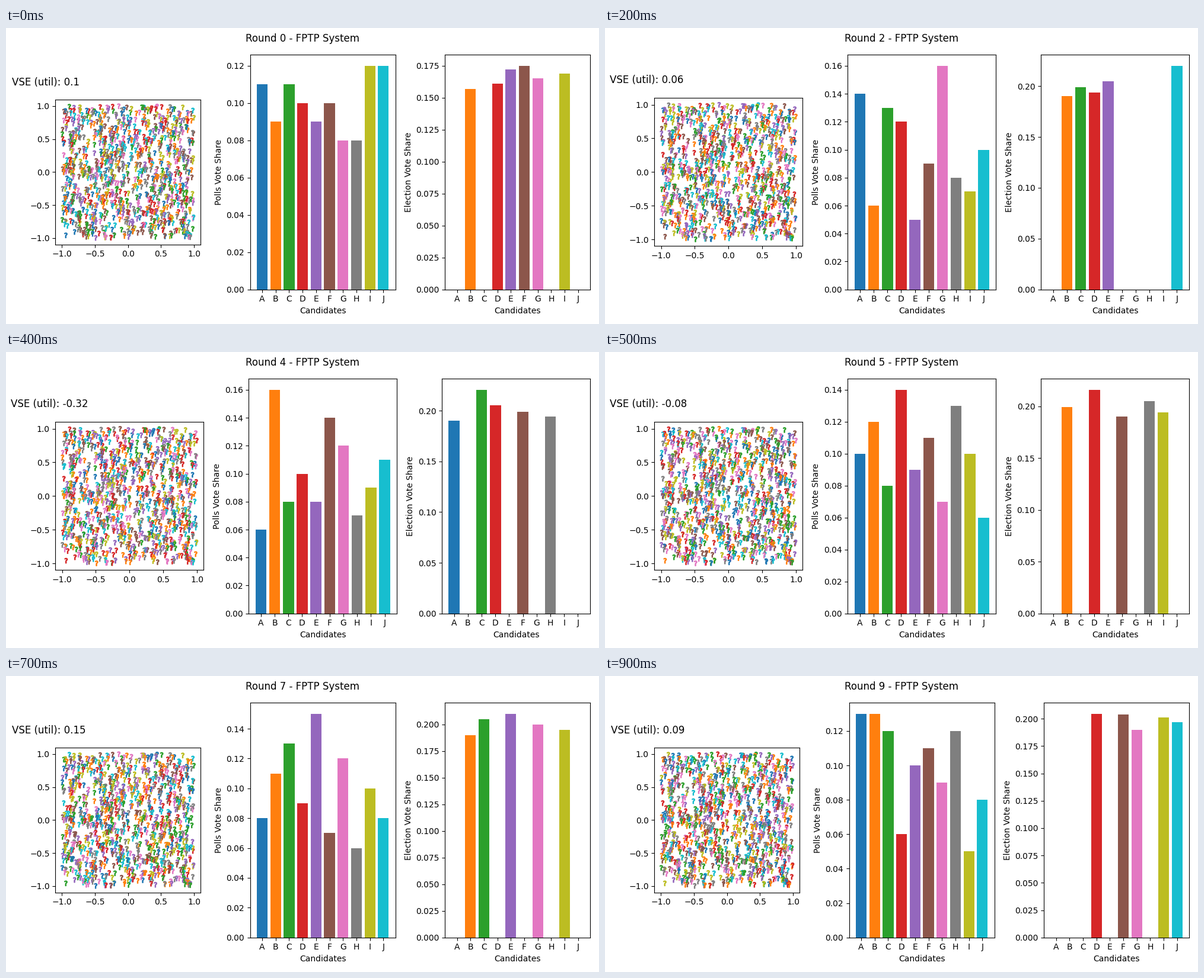
Write a matplotlib script that moves like this. It is 1000 by 500 pixels and loops after 1000 ms.

```python
import numpy as np
import matplotlib.pyplot as plt
from matplotlib.animation import FuncAnimation

NAMES = "ABCDEFGHIJ"
COLORS = [f"C{i}" for i in range(10)]
VOTERS = 1000

# Each round: utility, poll ranking with its best and worst share,
# election ranking with the winner's share
ROUNDS = [
    (0.1, "IJCADFBEHG", 0.12, 0.08, "FEIGDB", 0.175),
    (0.13, "CEHJAGDBFI", 0.13, 0.06, "CHJAE", 0.206),
    (0.06, "GACDJFHIBE", 0.16, 0.05, "JECDB", 0.22),
    (-0.05, "FACHBDEGIJ", 0.16, 0.06, "ACDFB", 0.2115),
    (-0.32, "BFGJDICEHA", 0.16, 0.06, "CDFHA", 0.2205),
    (-0.08, "DHBFAIECGJ", 0.14, 0.06, "DHBIF", 0.216),
    (0.21, "EFGIDACHJB", 0.13, 0.05, "FBGIAJ", 0.1875),
    (0.15, "ECGBIDJAFH", 0.15, 0.06, "ECGIB", 0.21),
    (0.19, "ADFIJGHCEB", 0.14, 0.05, "CFBEG", 0.2215),
    (0.09, "ABHCFEGJDI", 0.13, 0.05, "DFIJG", 0.2045),
]

voters = np.random.default_rng(7).uniform(-1, 1, (VOTERS, 2))

fig, (ax_map, ax_poll, ax_vote) = plt.subplots(1, 3, figsize=(10, 5), dpi=100)


def ranked_shares(ranking, high, low, digits):
    """Shares falling from high to low, bent so that they add up to about 1."""
    mean = 1 / len(ranking)
    bend = (mean - low) / (high - mean)
    t = np.linspace(0, 1, len(ranking)) ** bend
    shares = dict(zip(ranking, np.round(high - (high - low) * t, digits)))
    return [shares.get(name, 0) for name in NAMES]


def draw_voters(ax, n, utility):
    choice = np.random.default_rng(100 + n).integers(0, 10, VOTERS)
    ax.clear()
    ax.scatter(*voters.T, c=[COLORS[i] for i in choice], marker="$?$")
    ax.set(xlim=(-1.098, 1.098), ylim=(-1.098, 1.098), aspect="equal")
    ax.text(-0.3, 1.1, f"VSE (util): {utility}", fontsize=12,
            transform=ax.transAxes)


def draw_bars(ax, shares, label):
    ax.clear()
    ax.bar(list(NAMES), shares, color=COLORS)
    ax.set(xlabel="Candidates", ylabel=label)


def update(n):
    utility, polled, high, low, elected, top = ROUNDS[n]
    fig.suptitle(f"Round {n} - FPTP System", y=0.954, va="baseline")
    draw_voters(ax_map, n, utility)
    draw_bars(ax_poll, ranked_shares(polled, high, low, 2), "Polls Vote Share")
    draw_bars(ax_vote, ranked_shares(elected, top, 1 / len(elected) - 0.01, 4),
              "Election Vote Share")
    # Start from the default margins so the layout depends on n alone
    fig.subplots_adjust(left=0.125, right=0.9, bottom=0.11, top=0.88,
                        wspace=0.2, hspace=0.2)
    fig.tight_layout()
    fig.subplots_adjust(top=0.91)
    return []


anim = FuncAnimation(fig, update, frames=len(ROUNDS), init_func=lambda: [],
                     interval=100, repeat=True)
plt.show()
```
